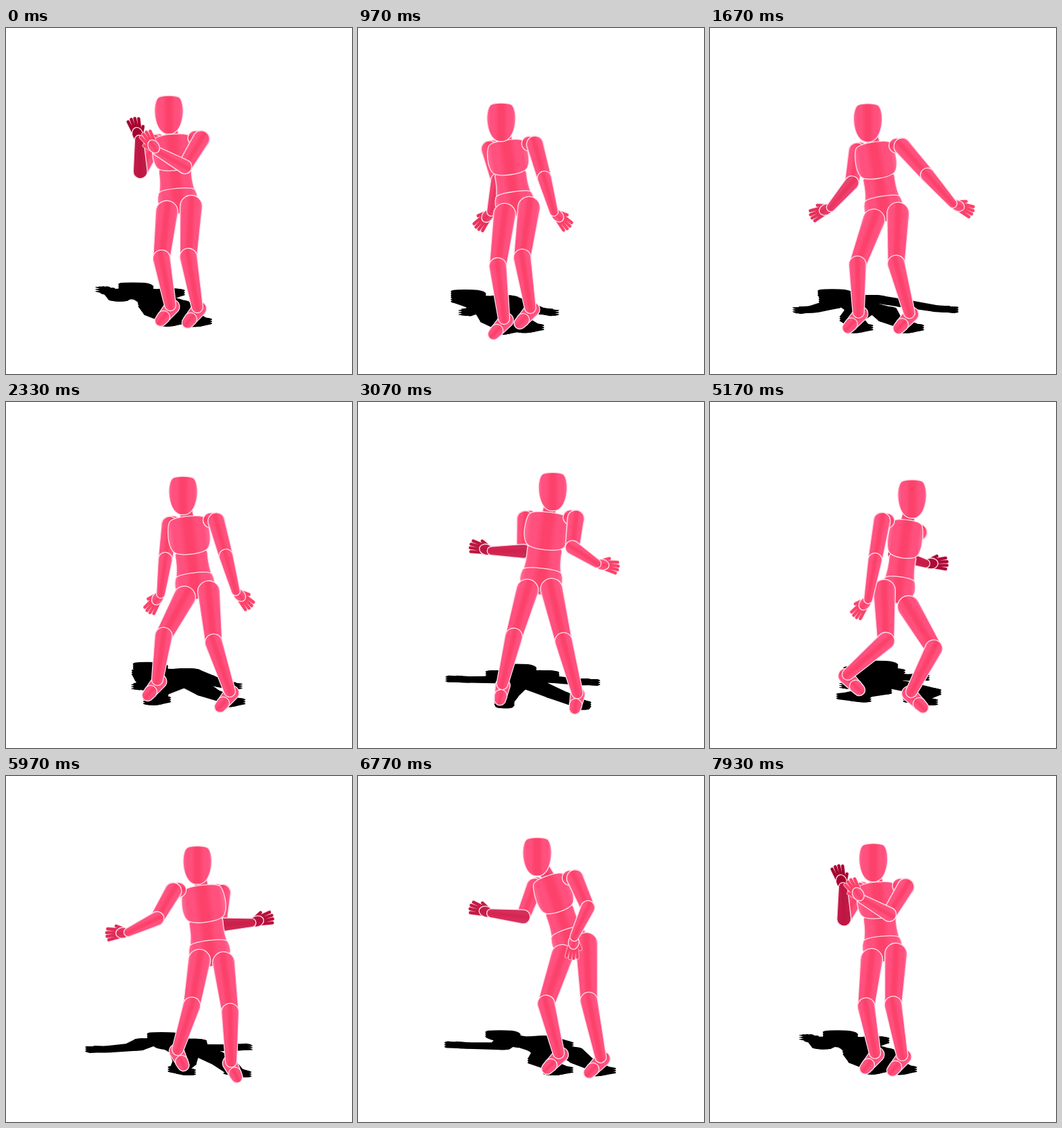
An HTML page with a canvas that plays this animation: 512x512 px, repeating every 7960 ms.

```html
<!DOCTYPE html>
<html>
<head>
<meta charset="utf-8">
<style>
html, body { margin: 0; width: 100%; height: 100%; overflow: hidden; background: #fff; }
canvas { display: block; width: 100%; height: 100%; }
</style>
</head>
<body>
<canvas id="stage" width="512" height="512"></canvas>
<script>
const ctx = document.getElementById('stage').getContext('2d');
const LOOP = 7960, STEP = 100 / 3;

// A few key points per pose; the other joints follow from them.
// turn: below 0 the body looks left, above 0 right.
const POSES = [
  { at: 0, turn: -.2, head: [241, 128], hips: [256, 268],
    handR: [197, 165], handL: [223, 182], footR: [243, 410], footL: [283, 413] },
  { at: 970, turn: -.25, head: [212, 139], hips: [235, 271],
    handR: [197, 272], handL: [290, 272], footR: [216, 430], footL: [255, 414] },
  { at: 2330, turn: -.2, head: [262, 138], hips: [282, 285],
    handR: [229, 284], handL: [340, 280], footR: [224, 411], footL: [331, 428] },
  { at: 3870, turn: .2, head: [309, 128], hips: [250, 271],
    handR: [232, 211], handL: [291, 244], footR: [201, 424], footL: [305, 431] },
  { at: 5170, turn: .6, head: [299, 143], hips: [276, 291],
    handR: [234, 292], handL: [319, 239], footR: [204, 403], footL: [298, 429] },
  { at: 6770, turn: -.45, head: [265, 119], hips: [320, 257],
    handR: [197, 203], handL: [320, 238], footR: [297, 410], footL: [359, 416] }
];

const SIDE = { R: -1, L: 1 };
const lerp = (a, b, u) => a + (b - a) * u;
const between = (a, b, u) => [lerp(a[0], b[0], u), lerp(a[1], b[1], u)];
const shift = (p, x, y) => [p[0] + x, p[1] + y];

// Key pose k, with the loop carried on before and after.
function key(k) {
  const n = POSES.length, pose = POSES[(k + n) % n];
  return { ...pose, at: pose.at + Math.floor(k / n) * LOOP };
}

// Middle joint of a limb: the shorter the reach, the further it bends.
function bend(a, b, length, amount) {
  const dx = b[0] - a[0], dy = b[1] - a[1], reach = Math.hypot(dx, dy) || 1;
  const normal = [dy / reach, -dx / reach];
  const size = Math.sqrt(Math.max(0, length ** 2 - reach ** 2)) / 2;
  const offset = size * amount(normal);
  return { joint: shift(between(a, b, .5), normal[0] * offset, normal[1] * offset), size };
}

function poseAt(time) {
  let i = 0;
  while (i < POSES.length - 1 && time >= POSES[i + 1].at) i++;
  const [k0, k1, k2, k3] = [i - 1, i, i + 1, i + 2].map(key);
  const span = k2.at - k1.at, u = (time - k1.at) / span, v = 1 - u;
  const blend = (a, b, c, d) => {
    const m1 = (c - a) / (k2.at - k0.at), m2 = (d - b) / (k3.at - k1.at);
    return b * (1 + 2 * u) * v * v + c * u * u * (3 - 2 * u) + span * u * v * (v * m1 - u * m2);
  };
  const p = { turn: blend(k0.turn, k1.turn, k2.turn, k3.turn) };
  for (const name of ['head', 'hips', 'handR', 'handL', 'footR', 'footL']) {
    p[name] = [0, 1].map(n => blend(k0[name][n], k1[name][n], k2[name][n], k3[name][n]));
  }

  const { turn } = p, facing = Math.tanh(turn * 6), narrow = Math.abs(turn);
  const swing = Math.sin(Math.PI * u) ** 2;
  const neck = between(p.head, p.hips, .28);
  p.near = turn > 0 ? 'R' : 'L';
  p.top = shift(neck, 0, -10);
  p.crotch = shift(p.hips, 0, 7);
  p.ribs = between(p.top, p.crotch, .43);
  p.waist = between(p.top, p.crotch, .71);
  p.chestWidth = 33 - 13 * narrow;
  p.hipWidth = 32 - 12 * narrow;

  for (const side in SIDE) {
    const s = SIDE[side];
    const shoulder = shift(neck, s * (38 - 18 * narrow) - 11 * facing, s * 14 * turn);
    const wrist = shift(p['hand' + side], s * 35 * swing, -25 * swing);
    // Elbows point down and back.
    const arm = bend(shoulder, wrist, 95, n => Math.tanh(4 * (n[1] - n[0] * facing)));
    const elbow = arm.joint;
    const length = Math.hypot(wrist[0] - elbow[0], wrist[1] - elbow[1]) || 1;
    const aim = Math.atan2((wrist[1] - elbow[1]) / length - .3, (wrist[0] - elbow[0]) / length + s * .35);
    const tip = shift(wrist, 32 * Math.cos(aim), 32 * Math.sin(aim));
    const shaded = side === 'R' || side !== p.near ? arm.size / 48 : 0;

    const hip = shift(p.hips, s * 18, s * 20 * turn);
    const ankle = p['foot' + side];
    const knee = bend(hip, ankle, 172, () => turn).joint;
    const toe = shift(ankle, 17 * facing, 23);
    p[side] = { shoulder, elbow, wrist, tip, shaded, hip, knee, ankle, toe };
  }
  return p;
}

let flat = false;

function tone(rgb, dark) {
  const deep = [160, 0, 44];
  return 'rgb(' + rgb.map((c, k) => Math.round(lerp(c, deep[k], dark))) + ')';
}

// Fills and outlines the current path, with bands running along the part.
function paint(radius, dark = 0) {
  if (flat) {
    ctx.fillStyle = ctx.strokeStyle = '#000';
    ctx.lineWidth = 8;
  } else {
    const light = tone([255, 80, 126], dark), mid = tone([252, 66, 106], dark);
    const edge = tone([255, 112, 154], dark);
    const g = ctx.createLinearGradient(0, -radius, 0, radius);
    [edge, light, light, mid, mid, light, light, edge].forEach((color, k) => {
      g.addColorStop(k / 7, color);
    });
    ctx.fillStyle = g;
    ctx.strokeStyle = '#ffe0ea';
    ctx.lineWidth = 1.3;
  }
  ctx.fill();
  ctx.stroke();
}

function along(a, b, draw) {
  const dx = b[0] - a[0], dy = b[1] - a[1];
  ctx.save();
  ctx.translate(a[0], a[1]);
  ctx.rotate(Math.atan2(dy, dx));
  ctx.beginPath();
  draw(Math.hypot(dx, dy));
  ctx.restore();
}

function limb(a, b, ra, rb, dark) {
  along(a, b, length => {
    ctx.arc(0, 0, ra, Math.PI / 2, Math.PI * 1.5);
    ctx.arc(length, 0, rb, -Math.PI / 2, Math.PI / 2);
    ctx.closePath();
    paint(Math.max(ra, rb), dark);
  });
}

// A smooth mirrored form; the profile holds [place along, half width].
function form(a, b, profile) {
  along(a, b, length => {
    const side = profile.map(([u, w]) => [u * length, w]);
    const ring = side.concat(side.map(([x, y]) => [x, -y]).reverse());
    ctx.moveTo(...between(ring[ring.length - 1], ring[0], .5));
    ring.forEach((p, k) => {
      ctx.quadraticCurveTo(...p, ...between(p, ring[(k + 1) % ring.length], .5));
    });
    ctx.closePath();
    paint(Math.max(...profile.map(p => p[1])));
  });
}

function hand({ wrist, tip, shaded }, s) {
  along(wrist, tip, length => {
    const palm = length * .5;
    const strokeFingers = (color, width) => {
      ctx.strokeStyle = flat ? '#000' : color;
      ctx.lineWidth = width;
      ctx.beginPath();
      for (let k = -1.5; k <= 1.5; k++) {
        ctx.moveTo(palm * .75, k * 3.4);
        ctx.lineTo(length - k * k, k * 5.4);
      }
      ctx.moveTo(palm * .2, -4 * s);
      ctx.lineTo(palm * 1.05, -11 * s);
      ctx.stroke();
    };
    ctx.lineCap = 'round';
    strokeFingers('#ffd0dc', 5.8);
    strokeFingers(tone([252, 66, 106], shaded), 4.4);
    ctx.beginPath();
    ctx.ellipse(palm * .5, 0, palm * .65, 8, 0, 0, 7);
    paint(8, shaded);
  });
}

function drawArm(p, side) {
  const part = p[side], { shoulder, elbow, wrist, shaded } = part;
  const inFront = side === p.near && elbow[1] > wrist[1];
  limb(between(shoulder, p.top, .2), shoulder, 11, 13);
  limb(shoulder, elbow, 12.5, 10.5);
  if (!inFront) hand(part, SIDE[side]);
  limb(elbow, wrist, 10.5, 6.5, side === p.near ? 0 : shaded * .7);
  if (inFront) hand(part, SIDE[side]);
}

function drawLeg({ hip, knee, ankle, toe }) {
  const heel = shift(between(ankle, toe, -.2), 0, 7);
  limb(hip, knee, 16.5, 12.5);
  limb(heel, toe, 11, 8.5);
  limb(knee, ankle, 13, 8.5);
  limb(between(heel, toe, .75), toe, 9.5, 8.5);
}

function figure(p) {
  const far = p.near === 'R' ? 'L' : 'R';
  const chest = p.chestWidth, hips = p.hipWidth;
  drawArm(p, far);
  limb(p.top, p.head, 10, 8, .1);
  form(p.ribs, p.waist, [[-.15, chest * .8], [.35, chest * .78], [.7, hips * .82], [1.15, hips * .92]]);
  form(p.waist, p.crotch, [[-.1, hips * .85], [.2, hips], [.6, hips], [1, 10]]);
  drawLeg(p[far]);
  drawLeg(p[p.near]);
  form(p.top, p.ribs, [[0, chest * .8], [.25, chest], [.75, chest * 1.04], [1.06, chest * .75]]);
  form(shift(p.head, 0, -28), shift(p.head, 0, 29),
    [[0, 12], [.1, 19], [.4, 22], [.75, 18.5], [1, 9]]);
  drawArm(p, p.near);
}

// The shadow is the same figure laid flat on the ground, thickened a little.
function shadow(p) {
  const ground = (p.footR[1] + p.footL[1]) / 2 + 26;
  flat = true;
  for (const dy of [-3, 0, 3]) {
    ctx.save();
    ctx.transform(1, 0, .18, .17, 8 - .18 * ground, .83 * ground + dy);
    figure(p);
    ctx.restore();
  }
  flat = false;
}

function draw(now) {
  const frame = Math.floor((now % LOOP + 3.4) / STEP);
  const pose = poseAt(frame * STEP);
  ctx.fillStyle = '#fff';
  ctx.fillRect(0, 0, 512, 512);
  shadow(pose);
  figure(pose);
}

const begin = performance.now();
function tick() {
  draw(performance.now() - begin);
  requestAnimationFrame(tick);
}
tick();
</script>
</body>
</html>
```
